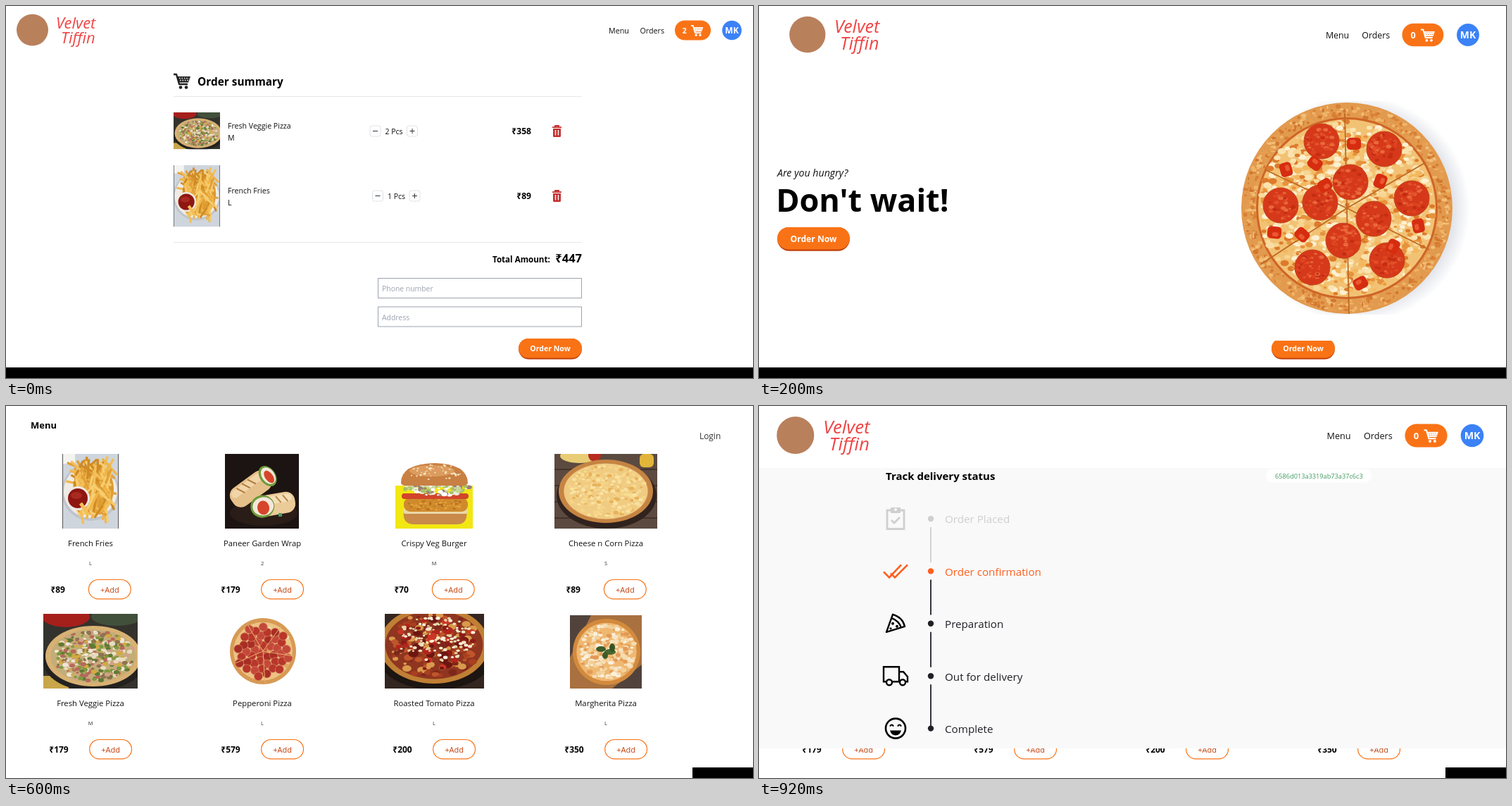
These frames come from a looping animation (1061x528 px, 1000 ms). An HTML page:

```html
<!DOCTYPE html>
<html lang="en">
<head>
<meta charset="utf-8">
<title>Food ordering demo</title>
<style>
  html, body { margin: 0; width: 100%; height: 100%; overflow: hidden; background: #fff; }
  #stage { display: block; width: 100vw; height: 100vh; }
  text { font-family: "Open Sans", "Noto Sans", sans-serif; white-space: pre; }
  .b { font-weight: 700; }
  .i { font-style: italic; }
  .m { text-anchor: middle; }
  .e { text-anchor: end; }
</style>
</head>
<body>
<svg id="stage" viewBox="0 0 1061 528"></svg>
<script>
const ORANGE = '#f97316', RUST = '#c2410c', INK = '#111';

// ---- drawing helpers ----
let seed = 1;
const rnd = () => (seed = seed * 16807 % 2147483647) / 2147483647;
const pick = list => list[Math.floor(rnd() * list.length)];
const many = (n, fn) => Array.from({ length: n }, (_, i) => fn(i)).join('');

const text = (x, y, size, str, fill = INK, cls = '') =>
  `<text x="${x}" y="${y}" font-size="${size}" fill="${fill}" class="${cls}">${str}</text>`;
const rect = (x, y, w, h, fill, rx = 0, extra = '') =>
  `<rect x="${x}" y="${y}" width="${w}" height="${h}" fill="${fill}" rx="${rx}" ${extra}/>`;
const oval = (x, y, rx, ry, fill, extra = '') =>
  `<ellipse cx="${x}" cy="${y}" rx="${rx}" ry="${ry}" fill="${fill}" ${extra}/>`;
const disc = (x, y, r, fill, extra) => oval(x, y, r, r, fill, extra);
const line = (d, color, width = 1, extra = '') =>
  `<path d="${d}" fill="none" stroke="${color}" stroke-width="${width}" ${extra}/>`;
const group = (x, y, s, body, turn = 0) =>
  `<g transform="translate(${x} ${y}) rotate(${turn}) scale(${s})">${body}</g>`;
const box = (x, y, w, h, color, rx = 0) =>
  rect(x, y, w, h, '#fff', rx, `stroke="${color}"`);

// ---- food pictures ----
const scatter = (cx, cy, rx, ry, n, size, colors) => many(n, () => {
  const a = rnd() * 2 * Math.PI, d = Math.sqrt(rnd()), s = size * (.4 + rnd() * .7);
  return oval((cx + Math.cos(a) * d * rx).toFixed(1), (cy + Math.sin(a) * d * ry).toFixed(1),
    s.toFixed(1), (s * .7).toFixed(1), pick(colors));
});
const pie = (cx, cy, rx, ry, crust, cheese, n, size, colors) =>
  oval(cx, cy, rx, ry, crust) + oval(cx, cy, rx * .89, ry * .88, cheese) +
  scatter(cx, cy, rx * .85, ry * .83, n, size, colors);
const cutEnd = (x, rx) => oval(x, 0, rx, 16, '#6d9a3a') + oval(x + 1, 0, rx - 2, 13, '#f3e8da') +
  oval(x + 1, 2, rx / 2, 10, '#d6452a');

const foods = {
  fries: { w: 80, h: 106, draw: () =>
    rect(0, 0, 80, 106, '#cfd5dd') + rect(0, 0, 18, 14, '#f3f3f0') +
    disc(40, 54, 41, '#bfc4cb') + disc(40, 53, 38, '#efebe5') + oval(44, 50, 29, 37, '#dd9a30') +
    many(120, () => {
      const x = 18 + rnd() * 50, y = 14 + rnd() * 74, a = (rnd() - .4) * 2.4, l = 8 + rnd() * 8;
      const dx = Math.sin(a) * l, dy = Math.cos(a) * l;
      return line(`M${x - dx} ${y - dy}L${x + dx} ${y + dy}`,
        pick(['#f0b548', '#e2a038', '#f7cd70', '#cf8b26', '#f3bf58']), 3.4);
    }) +
    disc(22, 63, 17, '#efe9e4') + disc(22, 63, 14, '#8e1712') +
    oval(20, 59, 8, 5, '#a92a20') + line('M26 70L37 86', '#f4bf55', 5) +
    line('M.5 0V106M79.5 0V106', '#555') },
  wrap: { w: 105, h: 106, draw: () =>
    rect(0, 0, 105, 106, '#1c1412') + oval(55, 84, 48, 18, '#2a1c17') +
    group(38, 48, 1, rect(-34, -15, 64, 31, '#e6c08a', 13) + rect(-30, -12, 52, 11, '#f0d5a8', 6) +
      line('M-18-12l6 12M-8-13l6 12M2-13l6 12', '#b17a3b', 2) + cutEnd(28, 11), -36) +
    group(68, 72, 1, rect(-28, -15, 60, 30, '#ebcb98', 13) + rect(-8, -12, 36, 11, '#f4dfb8', 6) +
      line('M6-11l6 10M16-11l6 10', '#b98748', 2) + cutEnd(-15, 17), -10) +
    rect(76, 84, 5, 5, '#4f9a63') },
  burger: { w: 110, h: 106, draw: () =>
    rect(0, 45, 110, 61, '#f2e713') +
    `<path d="M12 80H101Q104 99 88 100H26Q9 99 12 80Z" fill="#c98a4a"/>` +
    rect(11, 77, 92, 8, '#e9d8a6', 4) + rect(12, 62, 91, 20, '#cf8a2c', 9) +
    scatter(57, 72, 42, 8, 90, 2, ['#e5a63f', '#b66f1e', '#dc9835']) +
    rect(9, 56, 95, 8, '#d2452a', 4) +
    scatter(57, 50, 50, 9, 110, 4, ['#a9c064', '#e9eddc', '#c8d59a', '#fff', '#9a7d79']) +
    `<path d="M8 41Q8 14 56 13Q102 14 103 41Q102 46 92 45H20Q8 46 8 41Z" fill="#c98043"/>` +
    oval(52, 24, 32, 8, '#dc9c5f') +
    scatter(56, 26, 38, 11, 45, 1.8, ['#f7e3bd']) },
  corn: { w: 146, h: 106, draw: () =>
    rect(0, 0, 146, 106, '#5c4a40') +
    line('M0 22H146M0 45H146M0 68H146M0 91H146', '#43332c', 2) +
    oval(36, 3, 28, 10, '#e8cd75') + disc(57, 2, 9, '#b72b20') + rect(121, 0, 20, 19, '#e1b53a', 6) +
    oval(74, 59, 71, 47, '#30221d') +
    pie(73, 53, 67, 45, '#c58443', '#f0cb82', 260, 3.4, ['#f9e3a4', '#f5d488', '#e8b25a', '#f8dc92']) },
  veggie: { w: 134, h: 106, draw: () =>
    rect(0, 0, 134, 106, '#34322d') + oval(32, 4, 34, 15, '#a51f1b') + oval(104, 4, 36, 13, '#41503a') +
    rect(0, 88, 36, 18, '#c9a64a') + oval(72, 66, 73, 44, '#23221f') +
    pie(71, 60, 68, 43, '#d8b173', '#c3ad78', 380, 4,
      ['#e6dcc0', '#7d9940', '#b8685a', '#efe7d4', '#d3a93e', '#8f7450', '#d3a08a', '#5f7a34']) },
  pepperoni: { w: 94, h: 106, draw: () =>
    pie(47, 53, 47, 47, '#d79a55', '#ecc383', 60, 4, ['#f3dba9', '#e2a763']) +
    many(44, i => {
      const a = i * 2.4, d = 38 * Math.sqrt(i / 44);
      return disc(47 + Math.cos(a) * d, 53 + Math.sin(a) * d, 6, pick(['#b8362a', '#a82e25', '#c4483a']),
        'stroke="#d98763" stroke-width=".7"');
    }) + line('M47 53L25 15M47 53L73 17M47 53L90 60M47 53L8 70M47 53L50 98', '#e8b06b') },
  tomato: { w: 141, h: 106, draw: () =>
    rect(0, 0, 141, 106, '#33251f') + oval(72, 56, 84, 52, '#1d1512') +
    pie(70, 44, 78, 55, '#c07f35', '#8f3520', 130, 6, ['#c0552b', '#d99a4c', '#7d271a', '#a8401f']) +
    scatter(72, 44, 60, 38, 50, 7, ['#b3241c', '#cc3626', '#8c1b16', '#6d1712']) +
    scatter(72, 36, 56, 32, 120, 3, ['#f0e3c2', '#e7d3a2', '#fbf2dc']) },
  margherita: { w: 102, h: 104, draw: () =>
    rect(0, 0, 102, 104, '#51433c') +
    `<path d="M0 60L30 0H102V70L60 104H0Z" fill="#a8713f"/>` +
    pie(52, 52, 48, 47, '#d28a3d', '#efb871', 220, 4, ['#f8e6c6', '#f3d09a', '#e39a55', '#fbf1dd', '#f6dcb2']) +
    oval(44, 48, 7, 4, '#3d5c2a') + oval(57, 52, 8, 4, '#48682f') + oval(60, 46, 4, 6, '#385424') +
    oval(50, 57, 4, 5, '#3d5c2a') }
};
const photo = (name, x, y, w) => {
  const f = foods[name];
  seed = 4321;
  return `<svg x="${x}" y="${y}" width="${w}" height="${w * f.h / f.w}" viewBox="0 0 ${f.w} ${f.h}">${f.draw()}</svg>`;
};

function bigPizza() {
  seed = 77;
  const salami = [[799, 192], [888, 203], [741, 283], [797, 279], [840, 250], [927, 273],
    [873, 302], [830, 333], [786, 371], [892, 361]];
  const chunks = [[845, 195], [790, 223], [749, 232], [883, 249], [804, 255], [732, 322],
    [771, 325], [936, 312], [900, 341], [854, 393]];
  const crumbs = many(520, () => {
    const a = rnd() * 2 * Math.PI, d = 131 + rnd() * 15;
    return oval(835 + Math.cos(a) * d, 287 + Math.sin(a) * d, 1 + rnd() * 3, 1 + rnd() * 2,
      pick(['#d98035', '#efb468', '#d2772f', '#e7a053', '#f2bf78']));
  });
  return `<svg x="680" y="135" width="330" height="303" viewBox="680 135 330 303">
    <defs><radialGradient id="shade"><stop offset=".86" stop-color="#e3e5eb"/><stop offset="1" stop-color="#fff"/></radialGradient></defs>` +
    disc(848, 288, 162, 'url(#shade)') + disc(835, 287, 150, '#e29a4e') + crumbs +
    disc(835, 287, 129, '#cf6427') + disc(835, 287, 126, '#f2c274') +
    scatter(835, 287, 123, 123, 1100, 5.5,
      ['#fae3b0', '#f3b85e', '#e8923c', '#fdf0d2', '#f7d592', '#dd7a2c', '#f8dca0']) +
    line('M835 287L838 437M835 287L712 367M835 287L718 232M835 287L952 346M835 287L832 152M835 287L947 222',
      '#bd6a25', 1.8) +
    salami.map(([x, y]) => disc(x, y, 25, '#d6391a', 'stroke="#c2441c"') +
      scatter(x, y, 21, 21, 40, 3.5, ['#e2502a', '#c52d12', '#dd4520', '#e9683a'])).join('') +
    chunks.map(([x, y], i) => group(x, y, 1,
      rect(-10, -8, 20, 17, '#d62d10', 5) + rect(-6, -5, 9, 6, '#ea5730', 3), i * 37)).join('') +
    '</svg>';
}

// ---- interface parts ----
const cart = (x, y, s, color, gap) => group(x, y, s,
  line('M0 2H4L8 16H20', color, 2.4, 'stroke-linejoin="round"') +
  `<path d="M5 5H24L21 13.5H8Z" fill="${color}"/>` +
  line('M8 7.5H22M9 10.5H21', gap, 1.3, 'stroke-dasharray="1.6 1.8"') +
  disc(10, 20.5, 2.3, color) + disc(18, 20.5, 2.3, color));

const logo = (x, y, s) => group(x, y, s,
  disc(23.5, 0, 22.5, '#b9805c') +
  text(57, -2.5, 22, 'Velvet', '#ef4444', 'i') + text(64, 18.5, 22, 'Tiffin', '#ef4444', 'i'));

const nav = (x, y, s, count) => group(x, y, s,
  text(-175, 4.5, 10.7, 'Menu') + text(-130.5, 4.5, 10.7, 'Orders') +
  rect(-81, -14, 51, 28, ORANGE, 14) + text(-70.5, 4.2, 11, count, '#fff', 'b') +
  cart(-58, -8, .72, '#fff', ORANGE) +
  disc(0, 0, 13.8, '#3b82f6') + text(0, 4.5, 12, 'MK', '#fff', 'b m'));

const button = (x, y, w, s, label) => group(x, y, s,
  rect(0, 0, w, 29.5, RUST, 14.7) + rect(0, 0, w, 27.5, ORANGE, 13.7) +
  text(w / 2, 18, 10.6, label, '#fff', 'b m'));

const orderButton = button(728, 472, 90, 1, 'Order Now');
const bar = x => rect(x, 513, 1061 - x, 15, '#000');
const page = rect(0, 0, 1061, 528, '#fff');

const trash = (x, y) => group(x, y, 1,
  line('M0 3.2H13M4 2.5V1H9V2.5', '#c53030', 1.8) +
  `<path d="M1 5H12V15.5Q12 17 10.5 17H2.5Q1 17 1 15.5Z" fill="#c53030"/>` +
  line('M4.5 7V14.5M8.5 7V14.5', '#fff', 1.4));

const orderRow = (y, mid, name, size, count, price) =>
  text(315, y - 3.5, 10.6, name) + text(315, y + 13.5, 10.6, size) +
  [-26.5, 26].map(d => box(mid + d - 7.5, y - 7.5, 15, 15, '#dfe2e7', 3)).join('') +
  line(`M${mid - 30} ${y}h7M${mid + 22.5} ${y}h7M${mid + 26} ${y - 3.5}v7`, '#333') +
  text(mid, y + 4.5, 10.5, count + ' Pcs', INK, 'm') +
  text(746, y + 4.5, 12.1, '₹' + price, '#000', 'b e') + trash(776, y - 8.5);

// ---- scenes ----
const summary = () => page + logo(14, 34, 1) + nav(1031, 34.5, 1, 2) +
  cart(238, 95, 1, '#222', '#fff') + text(272, 113, 15.4, 'Order summary', '#000', 'b') +
  line('M238 128.5H818M238 335.5H818', '#e5e7eb') +
  photo('veggie', 238, 151, 66) + photo('fries', 238, 226, 66) +
  orderRow(177.5, 551, 'Fresh Veggie Pizza', 'M', 2, 358) +
  orderRow(269.5, 554.5, 'French Fries', 'L', 1, 89) +
  text(691, 364, 11.6, 'Total Amount:', '#000', 'b') + text(818, 364, 16.5, '₹447', '#000', 'b e') +
  ['Phone number', 'Address'].map((s, i) => box(528.5, 386.5 + i * 40.5, 289, 28, '#9ca3af') +
    text(534, 405 + i * 40.5, 10.4, s, '#9ca3af')).join('') +
  orderButton + bar(0);

const leftover = page + orderButton + rect(0, 0, 1061, 475, '#fff') + bar(0);

const home = () => leftover + logo(42, 40.5, 1.14) + nav(1007, 41, 1.155, 0) +
  text(26, 242, 14.2, 'Are you hungry?', INK, 'i') +
  text(24.2, 292, 45, "Don't wait!", '#000', 'b') +
  button(26, 314, 90, 1.144, 'Order Now') + bigPizza();

const loginLink = text(985, 46.5, 11.9, 'Login', '#333');

const field = (y, label, hint, size, dy) =>
  text(406, y - 11, 10.3, label, '#374151', 'b') +
  rect(406, y + 1, 249, 30.5, '#e8eaec', 4) + box(406.5, y + .5, 248, 29, '#e2e5e9', 3) +
  text(416, y + dy, size, hint, '#9ca3af');

const login = () => leftover + logo(49, 41.5, 1.13) +
  text(871, 46.5, 11.9, 'Menu', '#333') + text(922, 46.5, 11.9, 'Register', '#333') + loginLink +
  `<path d="M380 168V378Q380 383 385 383H675Q680 383 680 378V168Z" fill="#e1e3e5"/>` +
  `<path d="M381 168V376Q381 381 386 381H674Q679 381 679 376V168Z" fill="#fff"/>` +
  line('M380.5 168V375M679.5 168V375', '#fff', 1, 'stroke-dasharray="5 4"') +
  field(201, 'Email', 'Enter your email', 11.8, 19.5) +
  field(265, 'Password', '*'.repeat(18), 9.5, 18.5) +
  button(406, 322, 64.5, 1.144, 'Log In') +
  text(533, 343, 10.25, "Don't have an account ?", ORANGE, 'b');

// name, size, price, picture, picture x, y, width
const dishes = [
  ['French Fries', 'L', 89, 'fries', 80, 68, 80],
  ['Paneer Garden Wrap', '2', 179, 'wrap', 311, 68, 105],
  ['Crispy Veg Burger', 'M', 70, 'burger', 553, 68, 110],
  ['Cheese n Corn Pizza', 'S', 89, 'corn', 779, 68, 146],
  ['Fresh Veggie Pizza', 'M', 179, 'veggie', 53, 295, 134],
  ['Pepperoni Pizza', 'L', 579, 'pepperoni', 318, 295, 94],
  ['Roasted Tomato Pizza', 'L', 200, 'tomato', 538, 295, 141],
  ['Margherita Pizza', 'L', 350, 'margherita', 801, 297, 102]
];
const dish = ([name, size, price, pic, px, py, pw], i) => {
  const x = 120 + i % 4 * 244, y = i < 4 ? 0 : 227, short = price < 100 ? 1.3 : 0;
  return photo(pic, px, py, pw) + text(x, y + 199, 11.3, name, INK, 'm') +
    text(x, y + 226, 7.4, size, '#333', 'm') +
    text(x - 45 - short, y + 264.5, 12, '₹' + price, '#000', 'b m') +
    rect(x - 1.3 - short, y + 246.5, 59.8, 27.3, '#fff', 13.6, `stroke="${ORANGE}" stroke-width="1.2"`) +
    text(x + 28.7 - short, y + 264.5, 11, '+Add', RUST, 'm');
};
const menu = () => page + loginLink + text(35, 32, 13, 'Menu', '#000', 'b') +
  dishes.map(dish).join('') + bar(975);

const GREY = '#cfcfcf', HOT = '#fe5f1e', DARK = '#1f2025';
const steps = [
  ['Order Placed', GREY, c => line('M-12-12H12V14.5H-12Z M-6 2l4 4 8-8', c, 2.8) +
    rect(-7, -16, 14, 8, c, 1) + disc(0, -13, 2, '#f9f9f9')],
  ['Order confirmation', HOT, c => line('M-17 1l8 8L8-9M-7 3l6 6L17-9', c, 2.7)],
  ['Preparation', DARK, c => line('M-13 12L-4-13Q10-9 13 4Z M-6-8Q5-4 8 6', '#000', 2.4, 'stroke-linejoin="round"') +
    disc(-4, 0, 2, '#000') + disc(2, 4, 2, '#000') + disc(-7, 7, 1.6, '#000')],
  ['Out for delivery', DARK, c => line('M-17-13H5V8H-17Z M5-6H11L17 1V8H5', '#000', 2.4) +
    [-9, 10].map(x => disc(x, 9, 4, '#f9f9f9', 'stroke="#000" stroke-width="2.4"')).join('')],
  ['Complete', DARK, c => disc(0, 0, 14, 'none', 'stroke="#000" stroke-width="2.6"') +
    line('M-8-3q2.5-4 5 0M3-3q2.5-4 5 0', '#000', 2) +
    '<path d="M-8 3H8Q6 10 0 10T-8 3Z"/>']
];
const track = () => menu() + rect(0, 0, 1061, 88, '#fff') + rect(0, 88, 1061, 398, '#f9f9f9') +
  logo(24, 41.5, 1.18) + nav(1013, 42, 1.18, 0) +
  text(180, 105, 15, 'Track delivery status', '#000', 'b') +
  rect(720, 89.5, 150, 19, '#fff', 9.5) + text(733, 102.5, 9.2, '6586d013a3319ab73a37c6c3', '#3f9a5f') +
  steps.map(([label, color, icon], i) => {
    const y = 160 + i * 74.4;
    return group(194, y, 1, icon(color)) + disc(244, y, 4.2, color) +
      (i < 4 ? line(`M244 ${y + 12}V${y + (i < 3 ? 62 : 74)}`, i ? DARK : GREY, 1.8) : '') +
      text(264, y + 6.3, 15.2, label, color);
  }).join('');

// ---- playback ----
const stage = document.getElementById('stage');
stage.innerHTML = [summary, home, login, menu, track].map(scene => `<g>${scene()}</g>`).join('');
const scenes = [...stage.children];

function tick() {
  const now = Math.floor(performance.now() % 1000 / 200);
  scenes.forEach((g, i) => g.style.display = i === now ? '' : 'none');
  requestAnimationFrame(tick);
}
tick();
</script>
</body>
</html>
```
